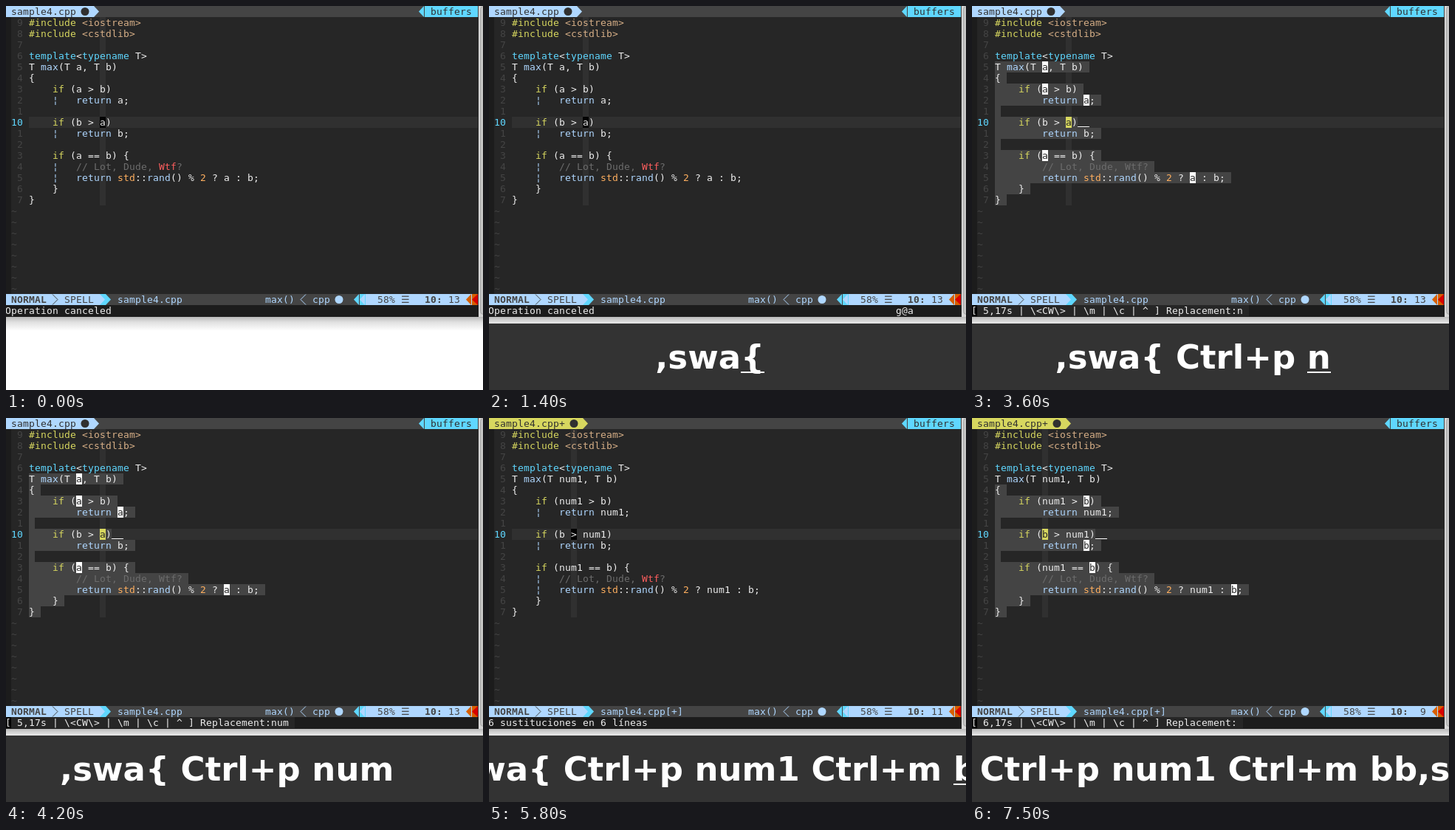
Write an HTML page with a canvas that moves like this. It is 646x520 px and loops after 8 s.

```html
<!DOCTYPE html>
<html lang="en">
<head>
<meta charset="utf-8">
<title>Rename in editor</title>
<style>
html, body { margin: 0; width: 100%; height: 100%; overflow: hidden; background: #fff; }
canvas { display: block; }
</style>
</head>
<body>
<canvas id="stage" width="646" height="520"></canvas>
<script>
const ctx = document.getElementById('stage').getContext('2d');
const LOOP = 8000, CELL = 8, ROW = 15, LEFT = 31, MID = 299.2;
const MONO = '13px "DejaVu Sans Mono", monospace';
const BOLD = 'bold ' + MONO;
const KEYS = 'bold 45px "DejaVu Sans", sans-serif';
const C = {
  bg: '#262626', line: '#303030', bar: '#444444', range: '#444444', text: '#eeeeee',
  sky: '#afd7ff', cyan: '#5fd7ff', yellow: '#d7d75f', tan: '#d7af87',
  orange: '#ffaf5f', grey: '#6c6c6c', red: '#ff5f5f', guide: '#5f87af'
};

// [start, typed text, end of underline]
const keys = [
  [500, ',', 700], [700, 's', 900], [900, 'w', 1100], [1100, 'a', 1300], [1300, '{', 1600],
  [2200, ' Ctrl+p', 2400], [3600, ' n', 3800], [3800, 'u', 3900], [4200, 'm', 0], [4600, '1', 4800],
  [4800, ' Ctrl+m', 5100], [5800, ' b', 5900], [6000, 'b', 6100],
  [6800, ',', 7000], [7000, 's', 7200], [7200, 'w', 7500], [7500, 'a{', 8000]
];
const prompt = (from, word = '') => `[ ${from},17s | \\<CW\\> | \\m | \\c | ^ ] Replacement:${word}`;
const messages = [
  [0, 'Operation canceled'], [1500, prompt(6)], [2200, prompt(5)], [3600, prompt(5, 'n')],
  [3800, prompt(5, 'nu')], [4200, prompt(5, 'num')], [4600, prompt(5, 'num1')],
  [4800, '6 sustituciones en 6 líneas'], [7500, prompt(6)]
];
const pending = [
  [0, ''], [500, ','], [700, ',s'], [900, ',sw'], [1100, 'g@a'], [1500, ''],
  [6900, ','], [7000, ',s'], [7200, ',sw'], [7500, '']
];
const cursors = [[0, 12], [5800, 10], [6000, 8]];
// first row of the marked range, 0 for none
const ranges = [[0, 0], [1500, 6], [2200, 5], [4900, 0], [7500, 6]];
const at = (list, t) => list.filter(e => e[0] <= t).pop()[1];

const source = name => [
  '#include <iostream>', '#include <cstdlib>', '', 'template<typename T>',
  `T max(T ${name}, T b)`, '{', `    if (${name} > b)`, `        return ${name};`, '',
  `    if (b > ${name})`, '        return b;', '', `    if (${name} == b) {`,
  '        // Lot, Dude, Wtf?', `        return std::rand() % 2 ? ${name} : b;`, '    }', '}'
];
const syntax = /(#include|\bif\b)|(<\w+>)|(template|typename)|(return|max|rand)|(std|\b\d\b)|(\/\/.*)/g;
const inks = [C.yellow, C.tan, C.cyan, C.sky, C.orange, C.grey];

function box(x, y, w, h, color) {
  ctx.fillStyle = color;
  ctx.fillRect(x, y, w, h);
}
function text(str, x, row, color, font = MONO) {
  ctx.font = font;
  ctx.fillStyle = color;
  [...str].forEach((ch, i) => ctx.fillText(ch, x + i * CELL, row * ROW + 12));
}
function poly(points, color) {
  ctx.fillStyle = color;
  ctx.beginPath();
  points.forEach(p => ctx.lineTo(...p));
  ctx.fill();
}
function dot(x, row, color) {
  ctx.fillStyle = color;
  ctx.beginPath();
  ctx.arc(x, row * ROW + 7.5, 5.5, 0, 7);
  ctx.fill();
}
// solid wedge whose flat side is at x and whose tip is at x + w
const wedge = (x, row, w, color) =>
  poly([[x, row * ROW], [x + w, row * ROW + 7.5], [x, row * ROW + 15]], color);
function chevron(x, w, color) {
  ctx.strokeStyle = color;
  ctx.lineWidth = 1;
  ctx.beginPath();
  ctx.moveTo(x, 390.5);
  ctx.lineTo(x + w, 397.5);
  ctx.lineTo(x, 404.5);
  ctx.stroke();
}

function drawCode(t) {
  const changed = t >= 4900, from = at(ranges, t), col = at(cursors, t);
  const word = t < 4900 ? 'a' : 'b', lines = source(changed ? 'num1' : 'a');
  box(0, 15, 640, 375, C.bg);
  box(0, 15, 7, 375, '#1c1c1c');
  box(LEFT + col * CELL, 15, CELL, 255, C.line);
  box(LEFT, 150, 608, ROW, C.line);
  for (let row = 18; row < 26; row++) text('~', 7, row, C.bar);

  lines.forEach((line, i) => {
    const row = i + 1, y = row * ROW, marked = from && row >= from;
    if (row === 10) text('10', 7, row, C.cyan);
    else text(String(Math.abs(row - 10)), 15, row, C.bar);
    if (marked) {
      const end = LEFT + line.length * CELL;
      box(LEFT, y, line.length * CELL + (row === 10 ? 0 : CELL), ROW, C.range);
      if (row === 10) box(end, y + 13, 16, 1, '#fff');
    }
    const colors = Array(line.length).fill(C.text);
    for (const m of line.matchAll(syntax))
      colors.fill(inks[m.slice(1).findIndex(Boolean)], m.index, m.index + m[0].length);
    const typo = line.indexOf('Wtf');
    if (typo > 0 && !from) colors.fill(C.red, typo, typo + 3);
    if (marked) {
      for (const m of line.matchAll(new RegExp(`\\b${word}\\b`, 'g'))) {
        const here = row === 10 && m.index === col;
        box(LEFT + m.index * CELL, y, CELL, ROW, here ? C.yellow : '#fff');
        colors[m.index] = C.bg;
      }
    }
    if (row === 10 && (!from || (t >= 4800 && t < 4900))) {
      box(LEFT + col * CELL, y, CELL, ROW, '#000');
      colors[col] = from ? C.bar : C.text;
    }
    [...line].forEach((ch, k) => text(ch, LEFT + k * CELL, row, colors[k]));
    if (!from && line.startsWith('        ')) text('¦', 63, row, C.sky);
  });
}

function drawBars(t) {
  const changed = t >= 4900, tab = changed ? C.yellow : C.sky, tabEnd = changed ? 127 : 119;
  box(0, 0, 640, ROW, C.bar);
  box(0, 0, tabEnd, ROW, tab);
  wedge(tabEnd, 0, 7, tab);
  text('sample4.cpp' + (changed ? '+' : ''), 7, 0, C.line);
  dot(tabEnd - 12, 0, C.line);
  wedge(566, 0, -7, C.cyan);
  box(567, 0, 72, ROW, C.cyan);
  text('buffers', 575, 0, C.line);

  box(0, 390, 640, ROW, C.bar);
  box(0, 390, 127, ROW, C.sky);
  box(127, 390, 8, ROW, C.cyan);
  wedge(127, 26, 7, C.sky);
  wedge(135, 26, 7, C.cyan);
  text('NORMAL', 7, 26, C.bar, BOLD);
  chevron(63, 7, C.bar);
  text('SPELL', 79, 26, C.bar);
  text('sample4.cpp' + (changed ? '[+]' : ''), 151, 26, C.sky);
  text('max()', 351, 26, C.sky);
  chevron(406, -7, C.sky);
  text('cpp', 415, 26, C.sky);
  dot(451, 26, C.sky);
  wedge(478, 26, -7, C.cyan);
  box(479, 390, 8, ROW, C.cyan);
  wedge(486, 26, -7, C.sky);
  box(487, 390, 152, ROW, C.sky);
  text('58%', 503, 26, C.bar);
  text('☰', 535, 26, C.bar);
  text('10:', 567, 26, C.bar, BOLD);
  text(String(at(cursors, t) + 1).padStart(2), 599, 26, C.bar);
  wedge(630, 26, -7, '#d75f00');
  box(631, 390, 8, ROW, '#d75f00');
  wedge(639, 26, -8, '#d70000');

  const msg = at(messages, t);
  box(0, 405, 640, 16, '#1c1c1c');
  if (msg[0] === '[') {
    box(0, 405, 7, ROW, '#000');
    box(7, 405, msg.length * CELL, ROW, C.bg);
  }
  text(msg, -1, 27, C.text);
  text(at(pending, t), 551, 27, C.text);
}

function drawFrame() {
  box(0, 0, 646, 520, '#fff');
  const shade = ctx.createLinearGradient(0, 420, 0, 440);
  shade.addColorStop(0, '#b4b4b4');
  shade.addColorStop(0.4, '#e0e0e0');
  shade.addColorStop(1, '#ffffff');
  box(0, 420, 646, 20, shade);
  box(640, 0, 6, 421, '#d6d6d6');
  ctx.fillStyle = '#c4c4c4';
  ctx.strokeStyle = '#a8a8a8';
  ctx.lineWidth = 1;
  ctx.beginPath();
  ctx.roundRect(642.5, 0.5, 10, 417, 4);
  ctx.fill();
  ctx.stroke();
}

function drawKeys(t) {
  const typed = keys.filter(k => k[0] <= t);
  if (!typed.length) return;
  const all = typed.map(k => k[1]).join(''), last = typed[typed.length - 1];
  box(0, 430, 646, 90, '#333333');
  ctx.font = KEYS;
  ctx.fillStyle = '#fff';
  const width = ctx.measureText(all).width, x = MID - width / 2;
  ctx.fillText(all, x, 491);
  if (t < last[2]) {
    const w = ctx.measureText(last[1].trim()).width;
    box(Math.round(x + width - w), 495, Math.round(w), 2, '#fff');
  }
}

function draw(now) {
  const t = now % LOOP;
  drawFrame();
  drawCode(t);
  drawBars(t);
  drawKeys(t);
  requestAnimationFrame(draw);
}
draw(0);
</script>
</body>
</html>
```
